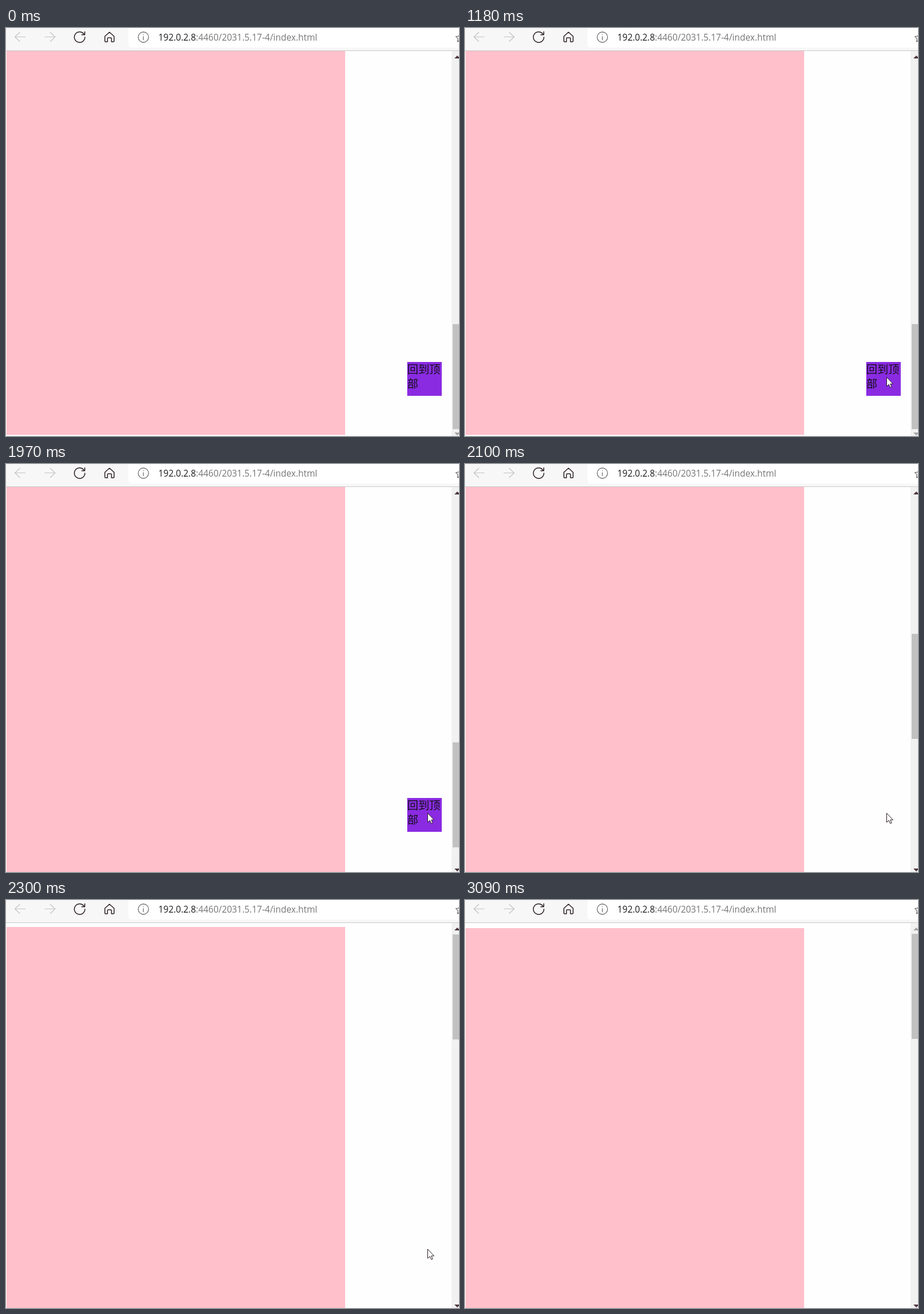
These frames come from a looping animation (788x711 px, 3890 ms). An HTML page:

```html
<!DOCTYPE html>
<html lang="zh-CN">
<head>
<meta charset="utf-8">
<title>Back to top</title>
<style>
  html, body { margin: 0; width: 100%; height: 100%; overflow: hidden; background: #fefefe; }
  svg { display: block; width: 788px; height: 711px; }
  .icon { fill: none; stroke: #2c2027; stroke-width: 1.5; stroke-linejoin: round; stroke-linecap: round; }
  .off { stroke: #c4c4c4; stroke-width: 1.2; }
  .grey { stroke: #707070; stroke-width: 1.3; }
  .url { font: 15.44px "Open Sans", "Noto Sans", sans-serif; fill: #757575; }
  .host { fill: #1b1b1b; }
  .label { font: 19.2px "Noto Sans CJK SC", "Noto Sans CJK", sans-serif; fill: #141018; }
  #beam { fill: none; stroke: #fff; mix-blend-mode: difference; }
</style>
</head>
<body>
<svg viewBox="0 0 788 711">
  <rect width="788" height="711" fill="#fefefe"/>
  <rect id="content" x="1" width="589" fill="#ffc0cb"/>

  <g id="button">
    <rect x="698" y="582" width="60" height="59" fill="#8a2be2"/>
    <text class="label" x="698" y="602">回到顶</text>
    <text class="label" x="698" y="627">部</text>
  </g>

  <rect x="775" y="40" width="13" height="671" fill="#f1f1f1"/>
  <rect id="thumb" x="777" width="11" height="183" fill="#c1c1c1"/>
  <path id="up" d="M785 48l5 5h-10z"/>
  <path id="down" d="M780 705h10l-5 5z"/>

  <rect width="788" height="39" fill="#f7f7f7"/>
  <rect y="39" width="788" height="1" fill="#c9c9c9"/>
  <path d="M213 0H788V34H218a5 5 0 0 1-5-5z" fill="#fff"/>
  <path class="icon off" d="M33.5 15.5H16M24 7.5l-8.5 8 8.5 8M67.500 15.500H85M77 7.500l8.500 8-8.500 8"/>
  <path class="icon" d="M137.300 16a9.200 9.200 0 1 1-2.400-6.200l1.700 1.700M137 6.500v5.200h-5.200"/>
  <path class="icon" d="M172 14.500l8-7.300 8 7.300v8.300q0 1.200-1.200 1.200h-3.300v-5.500q0-1.500-1.500-1.500h-4q-1.500 0-1.500 1.500v5.500h-3.300q-1.200 0-1.200-1.200z"/>
  <circle class="icon grey" cx="239" cy="16" r="9"/>
  <path class="icon grey" d="M239 15v5.500M239 11.600v.200"/>
  <path class="icon grey" d="M790 9.500l-2.300 4.600-5.200.800 3.800 3.700-1 5.300 4.700-2.500"/>
  <text class="url" x="265" y="21.600"><tspan class="host">192.0.2.8</tspan>:4460/2031.5.17-4/index.html</text>

  <path id="arrow" d="M0 0V16L3.700 12.600 6.300 18 8.700 17 6.300 11.700H11z" fill="#fff" stroke="#2a1a24"/>
  <path id="beam" d="M-3.500 -6.500H-1.500L-.500 -6 .500 -6.500H2.500M-.500 -6V6M-3.500 6.500H-1.500L-.500 6 .500 6.500H2.500"/>
  <circle id="click" cx="733" cy="608" r="14" fill="#ff0" opacity=".45"/>
</svg>
<script>
const LOOP = 3890;
const SCROLL = { start: 1901, length: 408, distance: 1673 };
const TICKS = [1970, 2035, 2100, 2165, 2230, 2300, 2360];
const THUMB = { top: 59, bottom: 516 };

// time, shape, x, y
const CURSOR = [
  [0, ''],
  [260, 'arrow', 743.5, 696],
  [325, 'arrow', 742.5, 656],
  [390, 'arrow', 740.5, 624],
  [450, 'beam', 739, 604],
  [1050, 'beam', 738, 606],
  [1115, 'arrow', 734.5, 607.5],
  [1180, 'arrow', 733.5, 608.5],
  [2760, 'arrow', 733.5, 612.5],
  [2825, 'arrow', 731.5, 624.5],
  [2890, 'arrow', 729.5, 643.5],
  [2960, 'arrow', 727.5, 669.5],
  [3025, 'arrow', 724.5, 698.5],
  [3090, '']
];

const el = id => document.getElementById(id);
const show = (id, on) => el(id).setAttribute('visibility', on ? 'visible' : 'hidden');

// Share of the way to the top, with swing easing on a coarse clock
function progress(t) {
  const tick = TICKS.filter(k => k <= t).pop() || 0;
  const p = Math.min(1, Math.max(0, (tick - SCROLL.start) / SCROLL.length));
  return 0.5 - Math.cos(Math.PI * p) / 2;
}

function drawPage(t) {
  const done = progress(t);
  const offset = SCROLL.distance * (1 - done);
  const bottom = Math.min(711, Math.round(709 + SCROLL.distance - offset));
  const top = Math.max(40, Math.round(49 - offset));
  el('content').setAttribute('y', top);
  el('content').setAttribute('height', bottom - top);
  el('thumb').setAttribute('y', Math.round(THUMB.bottom + (THUMB.top - THUMB.bottom) * done));
  el('up').setAttribute('fill', done === 1 ? '#a3a3a3' : '#4c343e');
  el('down').setAttribute('fill', done === 0 ? '#a3a3a3' : '#4c343e');
  show('button', t < 2100);
}

function drawCursor(t) {
  const [, shape, x, y] = CURSOR.filter(c => c[0] <= t).pop();
  for (const id of ['arrow', 'beam']) show(id, id === shape);
  if (shape) el(shape).setAttribute('transform', `translate(${x} ${y})`);
  show('click', t >= 1780 && t < 1970);
}

const begin = performance.now();
function frame() {
  const t = (performance.now() - begin) % LOOP;
  drawPage(t);
  drawCursor(t);
  requestAnimationFrame(frame);
}
frame();
</script>
</body>
</html>
```
